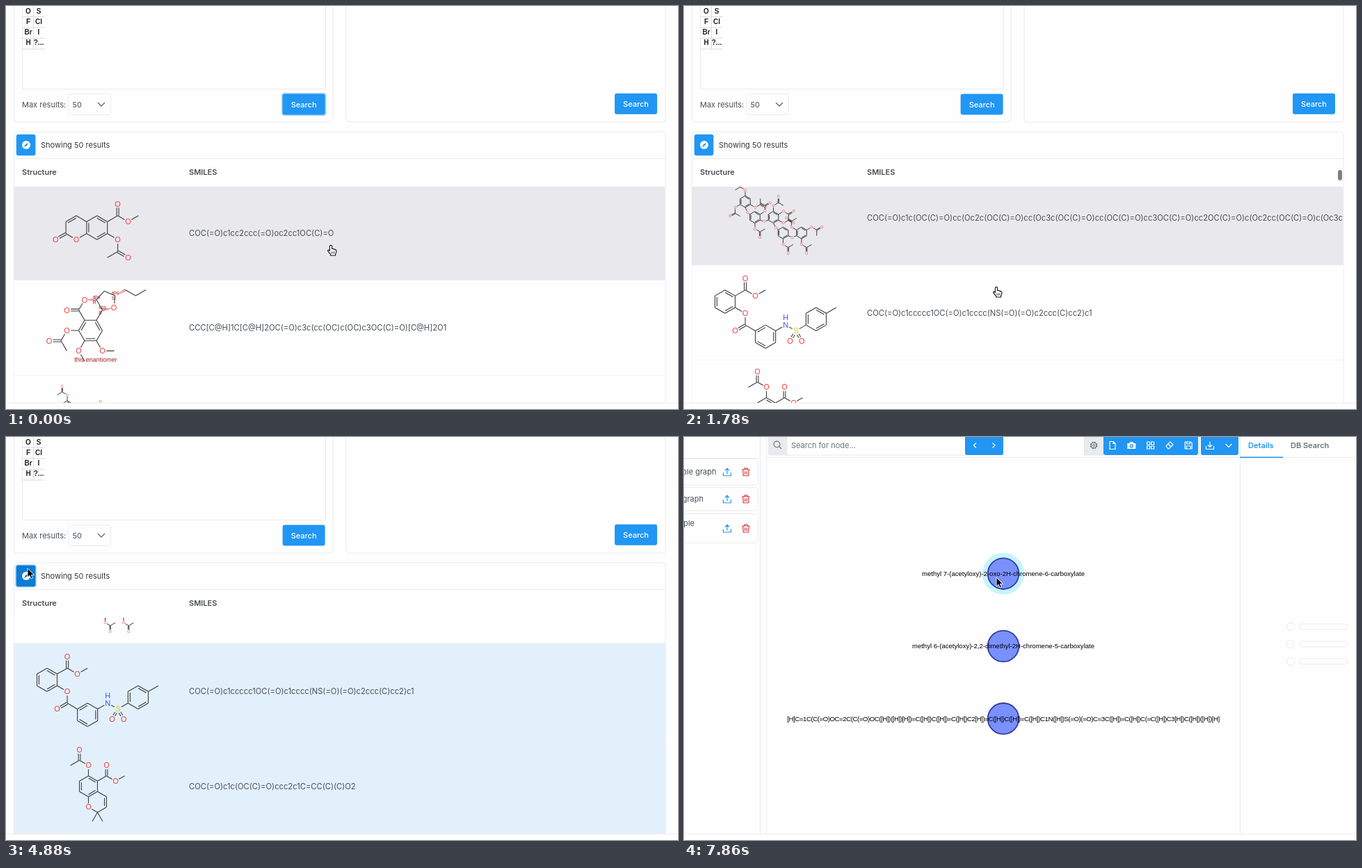
Recreate the animation shown at these times as an HTML page. Size 966 by 580 pixels, loop 7880 ms.

```html
<!DOCTYPE html>
<html lang="en">
<head>
<meta charset="utf-8">
<title>Structure search</title>
<style>
html, body { margin: 0; width: 100%; height: 100%; overflow: hidden; background: #fff; }
svg { display: block; position: fixed; left: 0; top: 0; }
text { font: 11px Inter, sans-serif; fill: #495057; }
.smiles { font-size: 11.2px; }
.b { font-weight: 600; }
.w { fill: #fff; font-weight: 500; text-anchor: middle; }
.e { font: bold 10px "Liberation Sans", sans-serif; fill: #222; text-anchor: middle; }
.a { font-family: "Liberation Sans", sans-serif; text-anchor: middle; }
.m { fill: #a51d1d; }
.n { font: 9.55px "Liberation Sans", sans-serif; fill: #000; text-anchor: middle; }
</style>
</head>
<body>
<svg id="stage" width="966" height="580" viewBox="0 0 966 580"></svg>
<script>
const LOOP = 7880, STEP = 148;
const BLUE = '#2196f3', EDGE = '#e9ebee', GRAY = '#6c757d';
const ELEMENT = { O: '#f23b3b', N: '#3c55f0', H: '#3c55f0', S: '#cfcf1c' };
const ROW_TOP = 258, ROW_H = 136.75, SCROLL = 371;

const text = (x, y, s, cls = '', more = '') => `<text x="${x}" y="${y}" class="${cls}" ${more}>${s}</text>`;
const path = (d, stroke = EDGE, more = '') => `<path d="${d}" fill="none" stroke="${stroke}" ${more}/>`;
const rect = (x, y, w, h, fill, more = '') => `<rect x="${x}" y="${y}" width="${w}" height="${h}" fill="${fill}" ${more}/>`;
const box = (x, y, w, h, r = 3) => rect(x, y, w, h, 'none', `stroke="${EDGE}" rx="${r}"`);
const circle = (x, y, r, fill, more = '') => `<circle cx="${x}" cy="${y}" r="${r}" fill="${fill}" ${more}/>`;
const at = (x, y, body, more = '') => `<g transform="translate(${x} ${y})" ${more}>${body}</g>`;

// Point one bond away in a clock direction
const toward = (p, hour, dist) => ({
  x: p.x + dist * Math.sin(hour * Math.PI / 6),
  y: p.y - dist * Math.cos(hour * Math.PI / 6)
});

function drawBond(a, b, kind, size) {
  const len = Math.hypot(b.x - a.x, b.y - a.y);
  const ux = (b.x - a.x) / len, uy = (b.y - a.y) / len, gap = size * .27;
  const start = a.l ? size * .52 : 0, end = len - (b.l ? size * .52 : 0);
  const p = (q, off) => `${(a.x + ux * q - uy * off).toFixed(1)} ${(a.y + uy * q + ux * off).toFixed(1)}`;
  const line = (off, inset = 0) => `M${p(start + inset, off)}L${p(end - inset, off)}`;
  if (kind === 'hash') {
    let d = '';
    for (let q = start; q < end; q += 2) d += `M${p(q, -q / 7)}L${p(q, q / 7)}`;
    return path(d, '#d33c3c');
  }
  const d = kind === 'double' ? line(-gap / 2) + line(gap / 2)
    : kind === 'inner' ? line(0) + line(gap, gap * .6) : line(0);
  return path(d, '#3c3c3c', `stroke-width="${size > 6 ? 1.1 : 1}"`);
}

// Builds a molecule from rings, bonds in clock directions and common groups
function sketch(len, size, build) {
  const atoms = [], bonds = [];
  const atom = (p, l) => {
    let a = atoms.find(q => Math.hypot(q.x - p.x, q.y - p.y) < 1.5);
    if (!a) atoms.push(a = { ...p, l });
    return a;
  };
  const join = (a, b, kind) => {
    if (!bonds.some(q => q.includes(a) && q.includes(b))) bonds.push([a, b, kind]);
    return b;
  };
  const grow = (a, hour, l, kind) => join(a, atom(toward(a, hour, len), l), kind);
  const ring = (centre, doubles, turn = 0) => {
    const v = [...Array(6).keys()].map(i => atom(toward(centre, 2 * i + turn, len)));
    v.forEach((a, i) => join(a, v[(i + 1) % 6], doubles.includes(i) ? 'inner' : 'single'));
    return v;
  };
  const acetate = (a, hour, turn) => {
    const c = grow(grow(a, hour, 'O'), hour + 2 * turn);
    grow(c, hour, 'O', 'double');
    grow(c, hour + 4 * turn);
  };
  const ester = (a, hour) => {
    const c = grow(a, hour);
    grow(c, hour - 2, 'O', 'double');
    grow(grow(c, hour + 2, 'O'), hour);
  };
  const extra = build({ atom, join, grow, ring, acetate, ester }) || '';
  return bonds.map(([a, b, kind]) => drawBond(a, b, kind, size)).join('')
    + atoms.filter(a => a.l).map(a =>
      text(a.x, a.y + size * .36, a.l, 'a', `style="font-size:${size}px;fill:${ELEMENT[a.l]}"`)).join('') + extra;
}

const FUSED = Math.sqrt(3);

const coumarin = sketch(17.2, 11, ({ grow, ring, acetate, ester }) => {
  const centre = { x: 101, y: 319 };
  const arene = ring(toward(centre, 3, 17.2 * FUSED), '024');
  const pyrone = ring(centre, '5');
  pyrone[3].l = 'O';
  grow(pyrone[4], 8, 'O', 'double');
  ester(arene[1], 2);
  acetate(arene[2], 4, 1);
});

const lactone = sketch(17, 11, ({ join, grow, ring, acetate }) => {
  const arene = ring({ x: 121.5, y: 467 }, '024', 1);
  const carbonyl = grow(arene[5], 11);
  grow(carbonyl, 9, 'O', 'double');
  const first = grow(grow(carbonyl, 1, 'O'), 3, '', 'hash');
  const last = grow(arene[0], 1);
  join(last, first);
  const bend = grow(first, 1.4), side = grow(bend, 3.8), oxygen = grow(side, 6.2, 'O');
  join(oxygen, last, 'hash');
  grow(grow(grow(side, 2, '', 'hash'), 4), 2);
  acetate(arene[4], 9, -1);
  grow(grow(arene[3], 7, 'O'), 5);
  grow(grow(arene[2], 5, 'O'), 3);
  const tag = (x, y, s) => text(x, y, s, 'a m', 'style="font-size:6.5px"');
  return [first, side, last].map((a, i) => tag(a.x, a.y - 2, 'abs') + tag(a.x - 3, a.y + 6, 'RSR'[i])).join('')
    + text(129, 512, 'this enantiomer', 'a m', 'style="font-size:9px"');
});

const cluster = sketch(8.4, 5, ({ atom, join, ring, acetate }) => {
  const centre = { x: 88, y: 436.5 };
  let prev;
  ['0-4-2-', '1-3-', '0+1+2-', '3-', '3-1+5+'].forEach((groups, i) => {
    const v = ring(centre, '024'), odd = i % 2;
    if (prev) {
      const a = prev[odd ? 3 : 2], b = v[odd ? 5 : 4];
      const o = atom({ x: (a.x + b.x) / 2, y: (a.y + b.y) / 2 + 2 }, 'O');
      join(a, o);
      join(o, b);
    }
    for (const [, n, sign] of groups.matchAll(/(\d)(.)/g)) acetate(v[n], 2 * n, sign === '+' ? 1 : -1);
    centre.x += odd ? 26.5 : 14;
    centre.y += odd ? 0 : 22.5;
    prev = v;
  });
});

const sulfonamide = sketch(16.8, 11, ({ atom, grow, ring, ester }) => {
  const left = ring({ x: 59, y: 349.5 }, '024');
  ester(left[1], 2);
  const carbonyl = grow(grow(left[2], 4, 'O'), 6);
  grow(carbonyl, 8, 'O', 'double');
  const middle = ring(toward(carbonyl, 4, 33.6), '135');
  grow(carbonyl, 4);
  const nitrogen = grow(middle[1], 2, 'N'), sulfur = grow(nitrogen, 4, 'S');
  atom(toward(nitrogen, 0, 10.8), 'H');
  [5, 7].forEach(hour => grow(sulfur, hour, 'O', 'double'));
  const right = ring(toward(sulfur, 2, 33.6), '024');
  grow(sulfur, 2);
  grow(right[1], 2);
});

const chromene = sketch(15, 10.5, ({ grow, ring, acetate, ester }) => {
  const centre = { x: 118.5, y: 502.7 };
  const arene = ring(centre, '024');
  const pyran = ring(toward(centre, 5, 15 * FUSED), '1');
  pyran[4].l = 'O';
  acetate(arene[0], 0, -1);
  ester(arene[1], 2);
  [5, 7].forEach(hour => grow(pyran[3], hour));
});

// smiles, drawing, drawing shift
const ROWS = [
  ['COC(=O)c1cc2ccc(=O)oc2cc1OC(C)=O', coumarin, 0],
  ['CCC[C@H]1C[C@H]2OC(=O)c3c(cc(OC)c(OC)c3OC(C)=O)[C@H]2O1', lactone, 0],
  ['COC(=O)c1c(OC(C)=O)cc(Oc2c(OC(C)=O)cc(Oc3c(OC(C)=O)cc(OC(C)=O)cc3OC(C)=O)cc2OC(C)=O)c(Oc2cc(OC(C)=O)c(Oc3c(OC(C)=O)cc', cluster, 140],
  ['COC(=O)c1ccccc1OC(=O)c1cccc(NS(=O)(=O)c2ccc(C)cc2)c1', sulfonamide, SCROLL],
  ['COC(=O)c1c(OC(C)=O)ccc2c1C=CC(C)(C)O2', chromene, SCROLL]
];

function tablePage() {
  const symbols = [['O', 'S'], ['F', 'Cl'], ['Br', 'I'], ['H', '?...']].map(([a, b], i) =>
    text(32, 11 + i * 15.1, a, 'e') + text(47, 11 + i * 15.1, b, 'e') + path(`M23 ${15.5 * (i + 1)}H56`, '#dcdcdc')).join('');
  const rows = ROWS.map(([smiles, drawing, dy], i) => {
    const y = ROW_TOP + i * ROW_H;
    return rect(11.5, y, 936.5, ROW_H, '#fefefe', 'class="row"') + path(`M11 ${y + ROW_H}H948`)
      + at(0, dy, drawing) + text(263, y + 72.6, smiles, 'smiles');
  }).join('');
  const search = (x, y) => rect(x, y, 61, 30, BLUE, 'rx="3"') + text(x + 30.5, y + 19.3, 'Search', 'w');
  return `<clipPath id="view"><path d="M11 260H947.5V571H11Z"/></clipPath>`
    + path('M11.5 0V163q0 4 4 4H466q4 0 4-4V0M489 0V163q0 4 4 4H944q4 0 4-4V0M23.5 0V119.5H459.5V0')
    + path('M39.5 0V62', '#dcdcdc') + symbols
    + text(23, 146, 'Max results:') + box(89.5, 126.5, 61, 30) + text(95.5, 146, '50')
    + path('M132 139l5 5 5-5', '#5f666d', 'stroke-width="1.3"')
    + rect(396, 125, 64.5, 33, '#a6d5fa', 'rx="4" id="focus"')
    + search(397.6, 126.6) + search(875, 125.8)
    + path('M11.5 571V185q0-4 4-4H944q4 0 4 4V571M11 219.5H948')
    + rect(13.2, 183.2, 30.6, 33.4, '#a6d5fa', 'rx="4" id="ring"')
    + rect(14.8, 184.8, 27.6, 30.4, BLUE, 'rx="3" id="explore"')
    + circle(29, 200, 6, '#fff') + `<path id="needle" d="M32 197l-2 4-4 2 2-4Z" fill="${BLUE}"/>`
    + text(50, 204, 'Showing 50 results', '', 'style="fill:#343a40"')
    + text(23, 243, 'Structure', 'b') + text(263, 243, 'SMILES', 'b')
    + `<g clip-path="url(#view)"><g id="rows">${rows}</g></g>`
    + rect(940, 228, 6, 15, '#7f7f7f', 'rx="3" id="thumb"');
}

function graphPage() {
  const icon = (d, color = '#fff') => path(d, color, 'stroke-width="1.2" stroke-linejoin="round"');
  const tray = 'M-5.5 1V5.5H5.5V1';
  const card = (y, h, end, s) => {
    const mid = y + h / 2;
    return box(-10, y, 116.5, h, 6) + text(end, h > 40 ? mid - 4 : mid + 4, s, '', 'text-anchor="end"')
      + at(62, mid, icon(tray + 'M0 3V-5M-3-2L0-5L3-2', BLUE))
      + at(89, mid, icon('M-5.5-3.5H5.5M-2-3.5V-5.5H2V-3.5M-4.3-3.5L-3.7 5.5H3.7L4.3-3.5M-1.3-1V3.5M1.3-1V3.5', '#d9343a'));
  };
  const tools = [
    icon('M-4-5.5H1L4-2.5V5.5H-4ZM1-5.5V-2.5H4'),
    '<path d="M-6-3H-3L-2-5H2L3-3H6V5H-6Z" fill="#fff"/>' + circle(0, 1, 2, 'none', `stroke="${BLUE}" stroke-width="1.3"`),
    icon('M-5-5h4v4h-4ZM1-5h4v4h-4ZM-5 1h4v4h-4ZM1 1h4v4h-4Z'),
    icon('M-5 1L1-5L5-1L-1 5H-2ZM-2-2L2 2'),
    icon('M-5-5H3L5-3V5H-5ZM-2.5-5V-2H2V-5M-3 5V1H3V5')
  ].map((body, i) => at(616 + i * 27.3, 12, body)).join('')
    + at(756, 12, icon(tray + 'M0-5.5V2.5M-3-.5L0 2.5L3-.5')) + at(783, 12, icon('M-4.5-2L0 2.5L4.5-2'));
  const gear = [[4.6, 'stroke-width="1.5" stroke-dasharray="2.4 1.21"'], [3.8, ''], [1.5, '']]
    .map(([r, more]) => circle(589, 12, r, 'none', `stroke="${GRAY}" ${more}`)).join('');
  const skeleton = [0, 1, 2].map(i => circle(872, 273 + 25 * i, 5.8, 'none', `stroke="${EDGE}"`)
    + box(884.5, 269 + 25 * i, 69, 8, 4)).join('');
  const node = (id, s, more = '') => `<g id="${id}">`
    + (id === 'up' ? circle(459, 301, 30, '#c6f4fd', 'id="halo"') : '')
    + circle(459, 301, 22.3, '#7a90ff', 'stroke="#2f3d9f" stroke-width="1.8"')
    + text(459, 304.3, s, 'n', more) + '</g>';
  return path('M0 30.5H109M109.5 0V571M118.5 0V571M118 29.5H799M799.5 0V571M861 29.5H966')
    + card(31.5, 37.5, 46.5, 'Example graph') + card(72.5, 33.5, 28, 'graph') + card(110.5, 42, 15, 'Example')
    + rect(121, -4, 27.5, 30, '#e9ecef') + box(121.5, -4, 283, 30)
    + circle(133.5, 10.5, 4.3, 'none', `stroke="${GRAY}" stroke-width="1.2"`) + icon('M136.7 13.7L140 17', GRAY)
    + text(154, 16, 'Search for node...', '', `style="fill:${GRAY}"`)
    + rect(404, -4, 55, 30, BLUE, 'rx="3"') + icon('M420 8.5L416.5 12L420 15.5M443.5 8.5L447 12L443.5 15.5')
    + rect(575.5, -4, 27, 30, '#e9ecef', 'stroke="#dfe2e6"') + gear
    + rect(603, -4, 136, 30, BLUE, 'rx="3"') + rect(743, -4, 54, 30, BLUE, 'rx="3"') + path('M740.5 0V26', '#b9dffb') + tools
    + text(811, 16, 'Details', 'b', `style="fill:${BLUE}"`) + text(872, 16, 'DB Search', 'b', `style="fill:${GRAY}"`)
    + rect(799, 28.5, 62, 1.6, BLUE) + skeleton
    + node('down', '[H]C=1C(C(=O)OC=2C(C(=O)OC([H])([H])[H])=C([H])C([H])=C([H])C2[H])=C([H])C([H])=C([H])C1N([H])S(=O)(=O)C=3C([H])=C([H])C(=C([H])C3[H])C([H])([H])[H]', 'letter-spacing="-.39"')
    + node('up', 'methyl 7-(acetyloxy)-2-oxo-2H-chromene-6-carboxylate')
    + node('mid', 'methyl 6-(acetyloxy)-2,2-dimethyl-2H-chromene-5-carboxylate');
}

const arrow = '<path id="arrow" d="M0 0V13L3 10.3L5.2 15L7.4 14L5.3 9.5H9.5Z" fill="#000" stroke="#fff" stroke-width=".9"/>';
const hand = `<g id="hand"><path d="M-1.6 1Q-1.4-.6 0-.6Q1.4-.6 1.6 1V4.6Q3.3 3.8 4 5Q5.6 4.5 6.1 5.9Q8 5.6 8 7.4Q8 10.5 6.6 12.2V14H-.4V12.4Q-2.4 10.4-4.2 7.6Q-4.6 6 -3 6L-1.6 7.4Z" fill="#fff" stroke="#111" stroke-width="1.1" stroke-linejoin="round"/>${path('M1 8.5V11.5M3 8.5V11.5M5 8.5V11.5', '#111', 'stroke-width=".8"')}</g>`;

document.getElementById('stage').innerHTML = rect(0, 0, 966, 580, '#fefefe')
  + `<g id="table">${tablePage()}</g><g id="graph">${graphPage()}</g>`
  + path('M0 571.5H966', '#ededef') + `<g id="cursor">${arrow}${hand}</g>`;

const $ = id => document.getElementById(id);
const rowRects = document.querySelectorAll('.row');
const show = (id, on) => $(id).setAttribute('visibility', on ? 'inherit' : 'hidden');
const move = (id, x, y) => $(id).setAttribute('transform', `translate(${x} ${y})`);
const ease = (k, from, to) => {
  const u = Math.min(1, Math.max(0, (k - from) / (to - from)));
  return u * u * (3 - 2 * u);
};

// Pointer moves: first step, last step, x, y
const MOVES = [[5, 7, 449, 405], [16, 19, 465, 497], [19, 21, 424, 483], [22, 24, 202, 238],
  [24, 30, 31, 189], [33, 40, 416, 307], [40, 50, 449, 202]];
const pointer = k => MOVES.reduce(([x, y], [from, to, tx, ty]) => {
  const u = ease(k, from, to);
  return [x + (tx - x) * u, y + (ty - y) * u];
}, [467, 345]);

const scrolled = k => SCROLL * ease(k, 7.13, 14);
const SELECTED_FROM = { 0: 5, 3: 16, 4: 19 };

function draw(t) {
  const k = Math.floor((t + 10) / STEP);
  const graph = k >= 35;
  const [x, y] = pointer(k);
  const onRows = !graph && y > 260;
  show('table', !graph);
  show('graph', graph);
  move('cursor', x, y);
  show('hand', onRows);
  show('arrow', !onRows);

  // Hover follows the scroll with a short delay
  const scroll = scrolled(k);
  const hovered = onRows ? Math.floor((y + 6 + scrolled(k - 2) - ROW_TOP) / ROW_H) : -1;
  move('rows', 0, -scroll);
  rowRects.forEach((r, i) => r.setAttribute('fill',
    k >= SELECTED_FROM[i] ? '#e2f0fc' : hovered === i ? '#e9e9ed' : '#fefefe'));
  move('thumb', 0, (scroll - 140) * .052);
  $('thumb').setAttribute('opacity', k < 8 ? 0 : 1 - ease(k, 15, 18));

  show('focus', k < 3);
  show('ring', !graph && k >= 33);
  const tone = k < 31 ? BLUE : k < 33 ? '#0d89ec' : '#0c7cd5';
  $('explore').setAttribute('fill', tone);
  $('needle').setAttribute('fill', tone);

  const spread = 104.3 * ease(k, 40, 45);
  move('up', 0, -spread);
  move('down', 0, spread);
  show('halo', k >= 45 && Math.hypot(x - 459, y - 197) < 23);
}

function frame() {
  draw(performance.now() % LOOP);
  requestAnimationFrame(frame);
}
frame();
</script>
</body>
</html>
```
